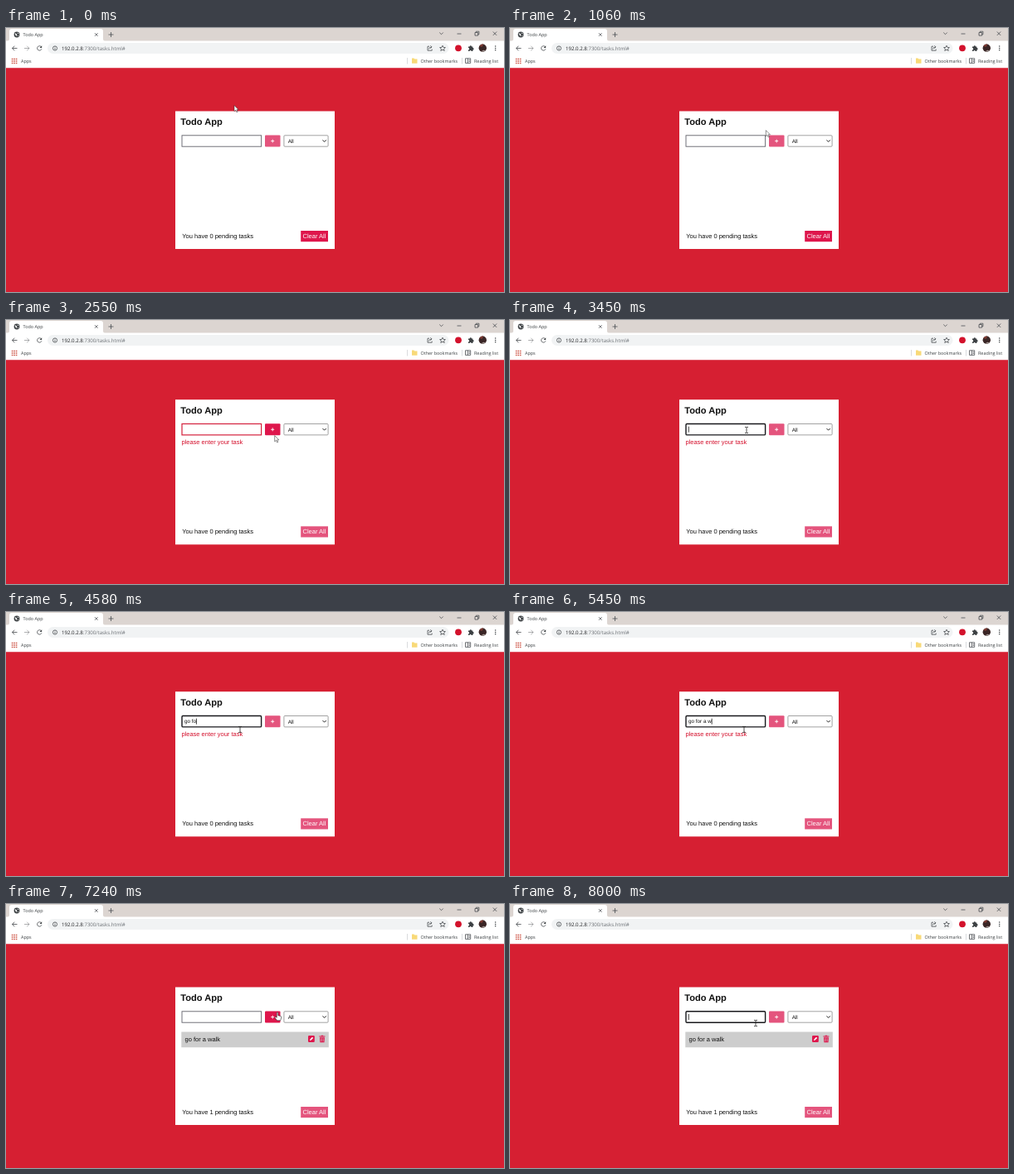
Write an HTML page that moves like this. It is 600 px wide and 319 px high and loops after 8.03 s.

```html
<!DOCTYPE html>
<html lang="en">
<head>
<meta charset="utf-8">
<title>Todo App</title>
<style>
html, body { margin: 0; width: 100%; height: 100%; overflow: hidden; background: #d61f32; }
svg { display: block; width: 600px; height: 319px; text-rendering: geometricPrecision; }
text { white-space: pre; }
.ui { font: 5.45px "Open Sans", sans-serif; fill: #3c4043; }
.app { font: 7.5px "Liberation Sans", Arial, sans-serif; fill: #111; }
.app .small { font-size: 6.35px; }
.line { fill: none; stroke: #4a4d51; stroke-width: .8; }
.white { fill: #fff; }
</style>
</head>
<body>
<svg viewBox="0 0 600 319">
  <!-- browser window -->
  <g class="ui">
    <path fill="#dcd5d1" d="M0 0H600V16H0z"/>
    <path class="white" d="M0 48.5V15.5H2Q4 15.5 4 13.5V4Q4 1 7 1H114Q117 1 117 4V13.5Q117 15.5 119 15.5H600V48.5z"/>
    <circle cx="13" cy="8" r="3.4" fill="#3c4043"/>
    <path d="M10.5 6.3l2 .4 .8 1.5 -1 2zM13.8 5.2l1.6 1.6 -1.2 .5zM14 9l1.3 -.3 -1 1.6z" fill="#fff"/>
    <text x="20.5" y="10">Todo App</text>
    <path class="line" d="M107 6.2l3.6 3.6m0 -3.6l-3.6 3.6M123.5 8h6m-3 -3v6" stroke-width="1"/>
    <path class="line" d="M522.3 5.5l2.2 2.2 2.2 -2.2M543.5 7h5M565 5.5h3.6v3.6h-3.6zM566.3 5.5V4.2h3.6v3.6h-1.3M586.8 4.5l4.4 4.4m0 -4.4l-4.4 4.4"/>

    <path class="line" d="M13.5 24.5H7.5m2.8 -2.8l-2.8 2.8 2.8 2.8"/>
    <path class="line" stroke-opacity=".55" d="M22 24.5h6m-2.8 -2.8l2.8 2.8 -2.8 2.8"/>
    <path class="line" d="M42.4 22.7A2.7 2.7 0 1 0 42.9 25.3"/>
    <path d="M43.2 21.2v2.7h-2.7z"/>
    <rect x="50" y="18" width="483.5" height="13" rx="6.5" fill="#f1f3f4"/>
    <circle class="line" cx="59" cy="24.5" r="2.6"/>
    <path class="line" d="M59 24.2v1.8M59 22.7v.7"/>
    <text x="67" y="26.6" font-size="6.1" style="font-size:6.1px"><tspan fill="#202124">192.0.2.8</tspan><tspan fill="#6b6f74">:7300/tasks.html#</tspan></text>
    <path class="line" d="M510 22.2h-2v5h5.2v-1.6M509.5 25.5q.3 -2.5 3.3 -2.5m-1.4 -1.7l1.7 1.7 -1.7 1.6"/>
    <path class="line" d="M526 21.2l1 2.2 2.4 .2 -1.8 1.6 .6 2.3 -2.2 -1.3 -2.2 1.3 .6 -2.3 -1.8 -1.6 2.4 -.2z" stroke-width=".7"/>
    <circle cx="545" cy="24.3" r="3.9" fill="#d3122c"/>
    <path fill="#3c4043" d="M557 22.5h1.6a1.2 1.2 0 0 1 2.4 0H562.4V24a1.2 1.2 0 0 1 0 2.4V28h-1.7a1.1 1.1 0 0 0 -2.2 0H557v-1.6a1.2 1.2 0 0 0 0 -2.4z"/>
    <circle cx="574.3" cy="24.2" r="4.7" fill="#3a2626"/>
    <path d="M570.2 22a4.7 4.7 0 0 1 5 -2.4l-1.5 3.2z" fill="#7d3a32"/>
    <path d="M573 28.5q1.3 -3 4.8 -1.2a4.7 4.7 0 0 1 -4.8 1.2z" fill="#a59a96"/>
    <g fill="#3c4043"><circle cx="589.7" cy="22" r=".75"/><circle cx="589.7" cy="24.4" r=".75"/><circle cx="589.7" cy="26.8" r=".75"/></g>

    <path stroke="#cf5a4c" stroke-width="1.6" stroke-dasharray="1.6 .9" d="M6.8 37.5h6.6M6.8 40h6.6M6.8 42.5h6.6"/>
    <text x="18" y="41.7">Apps</text>
    <path stroke="#c9ccd0" stroke-width=".7" d="M483.5 36v7.5M549.5 36v7.5"/>
    <path fill="#f8d978" d="M489 36.5h2.5l.8 1h3.2v5.2H489z"/>
    <text x="499.5" y="41.7">Other bookmarks</text>
    <path class="line" d="M553.5 36.8h6.2v5.6h-6.2zM556.3 36.8v5.6M557.5 38.7h1.5M557.5 40.4h1.5"/>
    <text x="564" y="41.7">Reading list</text>
  </g>

  <!-- page -->
  <path fill="#d61f32" d="M0 48.5H600V319H0z"/>
  <g class="app">
    <rect id="card" class="white" x="204" width="192"/>
    <g id="top">
      <text x="210.2" y="117" style="font-size:11.1px;font-weight:bold">Todo App</text>
      <rect id="field" x="212" y="129.8" width="95.6" height="13.4" fill="#fff"/>
      <text id="typed" class="small" x="215" y="138.7"></text>
      <path id="caret" stroke="#111" stroke-width=".8" d="M0 133v7"/>
      <rect id="add" x="312" y="129.5" width="18.5" height="14" rx="1"/>
      <path d="M319.2 136.6h4m-2 -2v4" stroke="#fff" stroke-width=".9"/>
      <rect x="334.9" y="129.8" width="53.2" height="13.4" rx="1" fill="#fff" stroke="#8b8b8b" stroke-width=".8"/>
      <text class="small" x="339.7" y="138.9">All</text>
      <path d="M381.5 135.4l2.1 2.1 2.1 -2.1" fill="none" stroke="#222" stroke-width="1"/>
    </g>
    <text id="error" x="211.4" y="149.8" fill="#d4102c" style="fill:#d4102c">please enter your task</text>
    <g id="item">
      <path fill="#cdcdcd" d="M211.3 154.5H388.8V173.2H211.3z"/>
      <text x="215.5" y="165.8">go for a walk</text>
      <rect x="364" y="159" width="7.8" height="8" rx="1.2" fill="#de164c"/>
      <path d="M366 165l.4 -1.6 2.6 -2.6 1.2 1.2 -2.6 2.6z" class="white"/>
      <path fill="#de164c" d="M377.4 159.6h2l.5 -.8h2l.5 .8h2v1h-7zM378 161.2h5.9l-.4 6h-5.1z"/>
      <path d="M379.5 162.2v4m1.4 -4v4m1.4 -4v4" stroke="#cdcdcd" stroke-width=".5"/>
    </g>
    <g id="foot">
      <text id="count" x="212.3" y="254"></text>
      <rect id="clear" x="355.2" y="245" width="32.8" height="13.2"/>
      <text x="357.5" y="254.2" style="fill:#fff">Clear All</text>
    </g>
  </g>

  <g id="cursor">
    <path id="arrow" d="M0 0v7.2l1.7 -1.5 1.2 2.6 1.2 -.5 -1.2 -2.6h2.2z" fill="#fff" stroke="#222" stroke-width=".5"/>
    <path id="hand" d="M-.8 .7q.8 -1 1.6 0v3.5l3 .7q1.1 .3 1 1.6l-.6 2.3 -.6 1.5h-4l-2.8 -3.7q.2 -1.2 1.4 -.6l1 .8z" fill="#fff" stroke="#222" stroke-width=".6"/>
    <path id="beam" d="M-2 -3.6h1.5l.5 .5 .5 -.5h1.5M0 -3.2v6.4M-2 3.6h1.5l.5 -.5 .5 .5h1.5" fill="none" stroke="#222" stroke-width=".8"/>
  </g>
</svg>
<script>
const LOOP = 8030, TASK = "go for a walk";
const ERROR = 2420, FOCUS = 3400, TYPE = 3850, KEY = 165, ADDED = 7120, REFOCUS = 7750;
const DARK = "#de164c", PINK = "#e4547d";
// pointer stops: time, x, y
const path = [
  [0, 275, 93.5], [450, 275, 93.5], [1400, 322, 136], [1910, 326, 139], [2300, 326, 139],
  [2550, 323.7, 139.7], [2750, 323.7, 139.7], [3250, 285, 133], [3600, 285, 133],
  [3900, 282, 142], [6100, 282, 142], [6390, 293, 141], [6550, 293, 141],
  [6950, 326, 131], [7240, 327, 130.5], [7400, 327, 130.5], [7800, 296, 144], [LOOP, 296, 144]
];
const $ = id => document.getElementById(id);
const set = (id, attrs) => { for (const k in attrs) $(id).setAttribute(k, attrs[k]); };
const show = (id, on) => set(id, { visibility: on ? "visible" : "hidden" });
const failed = t => t >= ERROR && t < ADDED;
const shift = t => failed(t) ? -4.3 : 0;

function pointer(t) {
  const i = Math.max(1, path.findIndex(p => p[0] > t));
  const [t0, x0, y0] = path[i - 1], [t1, x1, y1] = path[i];
  const u = (t - t0) / (t1 - t0), e = u * u * (3 - 2 * u);
  return [x0 + (x1 - x0) * e, y0 + (y1 - y0) * e];
}

function overAdd(t) {
  const [x, y] = pointer(Math.max(0, t)), top = 129.5 + shift(t);
  return x > 312 && x < 330.5 && y > top && y < top + 14;
}

function draw(t) {
  const bad = failed(t), dy = shift(t), added = t >= ADDED;
  const focused = t >= FOCUS && !added || t >= REFOCUS;
  const keys = Math.max(0, Math.min(TASK.length, Math.floor((t - TYPE) / KEY) + 1));
  const text = added ? "" : TASK.slice(0, keys);

  set("card", { y: 100.5 + dy, height: 166.5 - 2 * dy });
  set("top", { transform: `translate(0 ${dy})` });
  set("foot", { transform: `translate(0 ${-dy})` });
  show("error", bad);
  show("item", added);
  $("count").textContent = `You have ${added ? 1 : 0} pending tasks`;
  set("clear", { fill: t < 2530 ? DARK : PINK });
  set("add", { fill: overAdd(t) || overAdd(t - 150) ? DARK : PINK });
  set("field", {
    stroke: focused ? "#18181c" : bad ? "#d4203c" : "#62626a",
    "stroke-width": focused ? 1.4 : bad ? 1.2 : .9,
    rx: focused ? 1.2 : 0
  });

  $("typed").textContent = text;
  const last = added ? REFOCUS : keys ? TYPE + (keys - 1) * KEY : FOCUS;
  show("caret", focused && (t - last) % 1060 < 530);
  set("caret", { transform: `translate(${215.3 + (text ? $("typed").getComputedTextLength() : 0)} 0)` });

  const [x, y] = pointer(t);
  const hand = overAdd(t), beam = !hand && x > 212 && x < 308 && y > 125 && y < 151;
  set("cursor", { transform: `translate(${x} ${y})` });
  show("hand", hand);
  show("beam", beam);
  show("arrow", !hand && !beam);
}

const start = performance.now();
function tick() {
  draw((performance.now() - start) % LOOP);
  requestAnimationFrame(tick);
}
tick();
</script>
</body>
</html>
```
